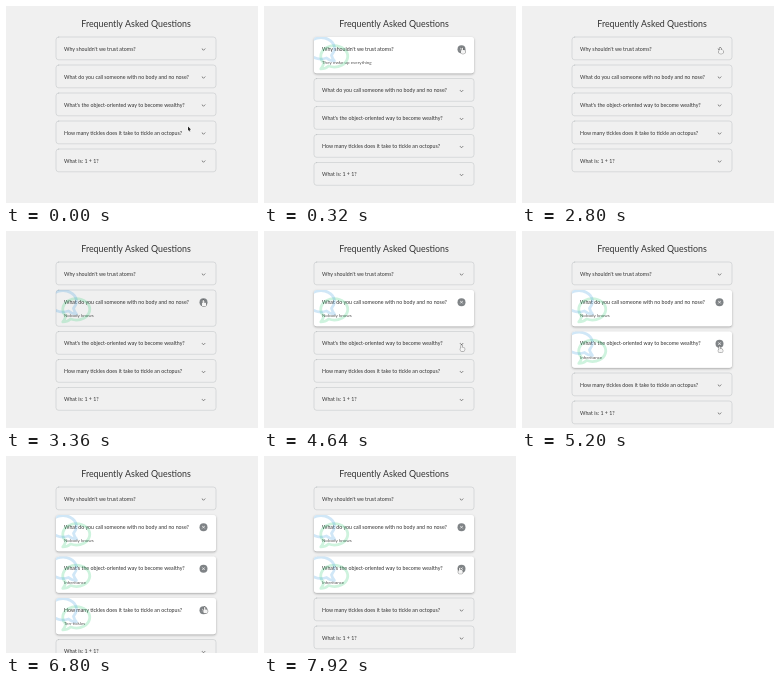
Animation of 252 by 197 pixels, one loop 8 s. Source, as an HTML page with a canvas:

```html
<!DOCTYPE html>
<html lang="en">
<head>
<meta charset="utf-8">
<title>Frequently Asked Questions</title>
<style>
html, body { margin: 0; width: 100%; height: 100%; overflow: hidden; background: #f0f0f0; }
canvas { display: block; width: 252px; height: 197px; }
</style>
</head>
<body>
<canvas id="stage"></canvas>
<script>
const W = 252, H = 197, LOOP = 8000, FADE = 300;
const LEFT = 50, TOP = 31, WIDTH = 160, CLOSED = 22.8, EXTRA = 13.5, GAP = 5.2;
const TOGGLE_X = LEFT + 147.5, TOGGLE_Y = 12.2, TOGGLE_R = 4;
const BACK = '#f0f0f0', FONT = 'Lato, "Open Sans", sans-serif';

const canvas = document.getElementById('stage');
const ctx = canvas.getContext('2d');
const dpr = window.devicePixelRatio || 1;
canvas.width = W * dpr;
canvas.height = H * dpr;

const items = [
  { q: "Why shouldn't we trust atoms?", a: 'They make up everything', open: 320, close: 2560, sudden: true },
  { q: 'What do you call someone with no body and no nose?', a: 'Nobody knows', open: 3360 },
  { q: "What's the object-oriented way to become wealthy?", a: 'Inheritance', open: 4800 },
  { q: 'How many tickles does it take to tickle an octopus?', a: 'Ten-tickles', open: 6160, close: 7040 },
  { q: 'What is: 1 + 1?' }
];

const home = { x: 182, y: 120.5 };
const moves = [
  { at: 0, time: 160, x: 182, y: 111.5 },
  { at: 320, time: 0, x: 198, y: 41.5 },
  { at: 2800, time: 400, x: 197, y: 69 },
  { at: 4240, time: 320, x: 197.5, y: 114 },
  { at: 5120, time: 720, x: 198.5, y: 151 },
  { at: 7280, time: 400, x: 195.5, y: 111.5 }
];

const ease = v => {
  const k = Math.max(0, Math.min(1, v));
  return k * k * (3 - 2 * k);
};

function pointerAt(t) {
  let { x, y } = home;
  for (const m of moves) {
    if (t < m.at) break;
    const k = m.time ? ease((t - m.at) / m.time) : 1;
    x += (m.x - x) * k;
    y += (m.y - y) * k;
  }
  return { x, y };
}

const isOpen = ({ open = LOOP, close = LOOP }, t) => t >= open && t < close;

function whiteness(item, t) {
  if (item.sudden) return isOpen(item, t) ? 1 : 0;
  const { open = LOOP, close = LOOP } = item;
  return ease((t - open) / FADE) - ease((t - close) / FADE);
}

function text(str, x, y, size, color, align = 'left') {
  ctx.font = `${size}px ${FONT}`;
  ctx.fillStyle = color;
  ctx.textAlign = align;
  ctx.fillText(str, x, y);
}

function line(points, color) {
  ctx.beginPath();
  points.forEach(([x, y]) => ctx.lineTo(x, y));
  ctx.strokeStyle = color;
  ctx.lineWidth = 0.7;
  ctx.lineCap = ctx.lineJoin = 'round';
  ctx.stroke();
}

// Outlined speech bubble, tail at the lower left unless mirrored
function bubble(x, y, color, mirrored) {
  const size = 29.9;
  ctx.save();
  ctx.translate(mirrored ? x + size : x, y);
  ctx.scale(mirrored ? -1 : 1, 1);
  ctx.beginPath();
  ctx.ellipse(size / 2, 14, 13.5, 10.7, 0, 2.55, 2 + Math.PI * 2);
  ctx.quadraticCurveTo(6, 26.6, 1.5, 26.6);
  ctx.quadraticCurveTo(3.6, 24, 4.4, 21);
  ctx.closePath();
  ctx.strokeStyle = color;
  ctx.lineWidth = 2.8;
  ctx.lineJoin = 'round';
  ctx.globalAlpha = 0.23;
  ctx.stroke();
  ctx.restore();
}

function toggle(x, y, active) {
  if (!active) {
    line([[x - 1.5, y - 0.4], [x, y + 1.1], [x + 1.5, y - 0.4]], '#555');
    return;
  }
  ctx.beginPath();
  ctx.arc(x, y, TOGGLE_R, 0, Math.PI * 2);
  ctx.fillStyle = '#7f8386';
  ctx.fill();
  line([[x - 1, y - 1], [x + 1, y + 1]], '#fff');
  line([[x + 1, y - 1], [x - 1, y + 1]], '#fff');
}

function card(item, y, t) {
  const active = isOpen(item, t);
  const h = CLOSED + (active ? EXTRA : 0);
  const white = whiteness(item, t);
  const box = new Path2D();
  box.roundRect(LEFT, y, WIDTH, h, 2.7);

  ctx.save();
  ctx.shadowColor = `rgba(0,0,0,${0.32 * white})`;
  ctx.shadowBlur = 2.4 * dpr;
  ctx.shadowOffsetY = 0.9 * dpr;
  ctx.fillStyle = BACK;
  ctx.fill(box);
  ctx.restore();
  ctx.fillStyle = `rgba(255,255,255,${white})`;
  ctx.fill(box);
  ctx.strokeStyle = `rgba(159,164,168,${0.75 * (1 - white)})`;
  ctx.lineWidth = 0.4;
  ctx.stroke(box);

  text(item.q, LEFT + 8, y + 13.6, 5.27, '#333');
  if (active) {
    text(item.a, LEFT + 8, y + 27.2, 4.5, '#555');
    ctx.save();
    ctx.clip(box);
    bubble(LEFT + 5.3, y + 5.3, '#2ecc71', false);
    bubble(LEFT - 8, y - 2.7, '#3498db', true);
    ctx.restore();
  }
  toggle(TOGGLE_X, y + TOGGLE_Y, active);
  return h + GAP;
}

function outline(path, fill, stroke) {
  ctx.lineWidth = 0.8;
  ctx.lineJoin = 'round';
  ctx.strokeStyle = stroke;
  ctx.stroke(path);
  ctx.fillStyle = fill;
  ctx.fill(path);
}

function pointer(t, tops) {
  const { x, y } = pointerAt(t);
  const over = tops.some(top => Math.hypot(x - TOGGLE_X, y - top - TOGGLE_Y) < TOGGLE_R + 0.5);
  ctx.save();
  ctx.translate(x, y);
  if (over) {
    const hand = new Path2D();
    hand.roundRect(-0.4, 0, 1.3, 4, 0.6);
    hand.roundRect(-1.2, 2.6, 4.4, 3.6, 1.2);
    outline(hand, '#f4f4f4', '#555');
  } else {
    outline(new Path2D('M0 0V4.3L1 3.4L1.7 5L2.4 4.7L1.7 3.2L3 3.1Z'), '#222', '#fff');
  }
  ctx.restore();
}

function draw(t) {
  ctx.setTransform(dpr, 0, 0, dpr, 0, 0);
  ctx.fillStyle = BACK;
  ctx.fillRect(0, 0, W, H);
  text('Frequently Asked Questions', 130, 20.6, 8.85, '#333', 'center');
  const tops = [];
  let y = TOP;
  for (const item of items) {
    tops.push(y);
    y += card(item, y, t);
  }
  pointer(t, tops);
}

const start = performance.now();
function tick() {
  draw((performance.now() - start) % LOOP);
  requestAnimationFrame(tick);
}
tick();
</script>
</body>
</html>
```
